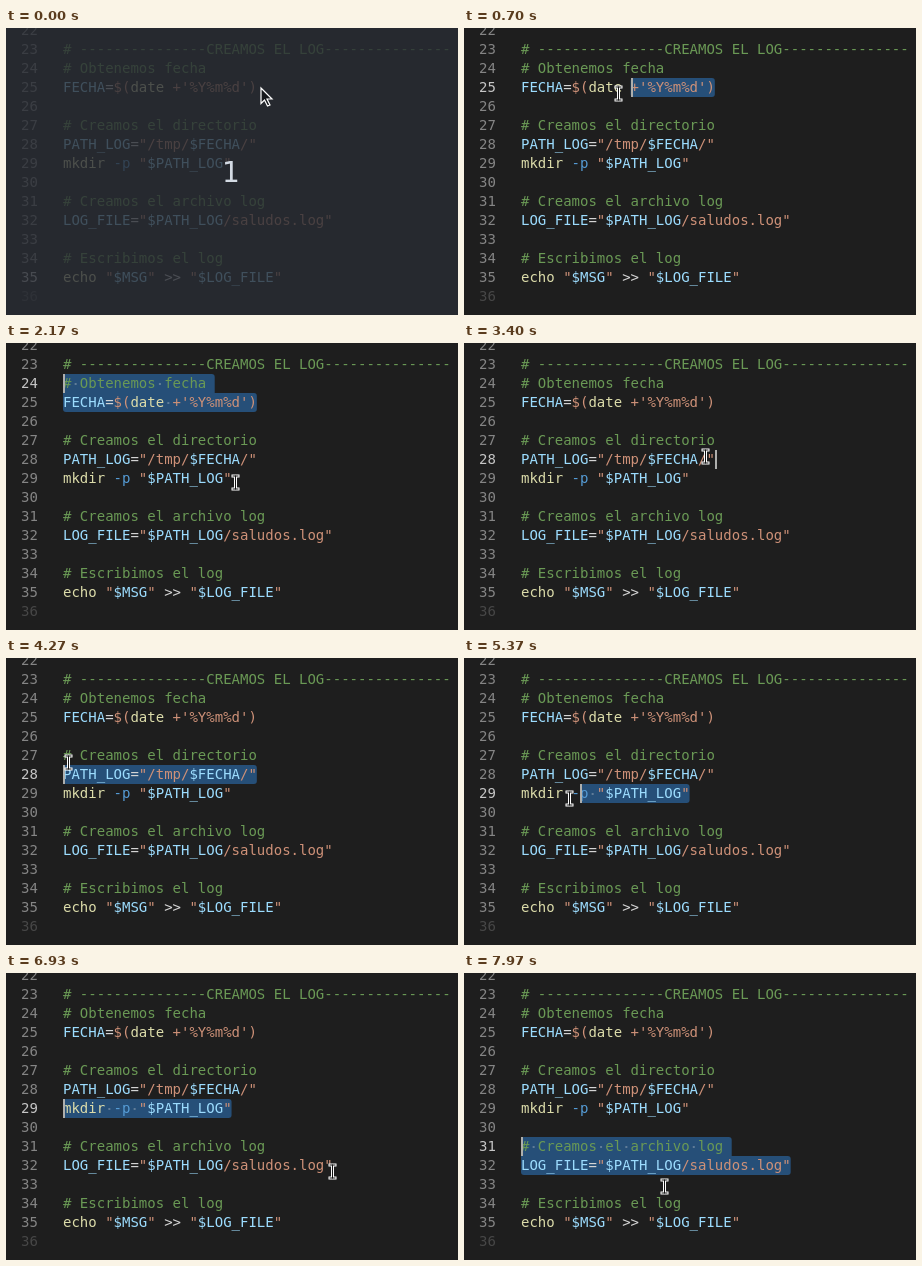
Recreate the animation shown at these times as an HTML page with a canvas. Size 452 by 287 pixels, loop 8 s.

```html
<!DOCTYPE html>
<html lang="es">
<meta charset="utf-8">
<style>
html, body { margin: 0; width: 100%; height: 100%; overflow: hidden; background: #1e1e1e; }
canvas { display: block; }
</style>
<canvas width="452" height="287"></canvas>
<script>
const ctx = document.querySelector('canvas').getContext('2d');
const LOOP = 8000, FIRST = 22, ROW = 19, LEFT = 57, CHAR = 14 * 0.602, LAG = 20;

const lines = [
  '',
  '# ---------------CREAMOS EL LOG---------------',
  '# Obtenemos fecha',
  "FECHA=$(date +'%Y%m%d')",
  '',
  '# Creamos el directorio',
  'PATH_LOG="/tmp/$FECHA/"',
  'mkdir -p "$PATH_LOG"',
  '',
  '# Creamos el archivo log',
  'LOG_FILE="$PATH_LOG/saludos.log"',
  '',
  '# Escribimos el log',
  'echo "$MSG" >> "$LOG_FILE"',
  ''
];

// One capture group per colour: comment, variable, string, option, command
const syntax = /(#.*)|(\$?[A-Z_]{2,})|(\+'.*'|\$\(|\)|"|\/[a-z.\/]*)|(-p)|(mkdir|date|echo)|./g;
const colors = ['#6a9955', '#9cdcfe', '#ce9178', '#569cd6', '#dcdcaa'];

// Mouse strokes: each eases from the previous end to x, y; bow bends it vertically
const strokes = [
  { from: 0, to: 1, x: 254, y: 59 },
  { from: 470, to: 950, x: 43, y: 39, bow: 15, drag: true },
  { from: 1300, to: 1970, x: 229, y: 139 },
  { from: 2250, to: 2270, x: 224, y: 137, drag: true },
  { from: 2770, to: 2970, x: 254, y: 113 },
  { from: 3330, to: 3800, x: 46, y: 109, drag: true },
  { from: 4130, to: 4930, x: 237, y: 136, bow: -14 },
  { from: 5000, to: 5580, x: 49, y: 127, bow: 11, drag: true },
  { from: 5870, to: 6170, x: 244, y: 176 },
  { from: 6400, to: 6730, x: 332, y: 205 },
  { from: 6870, to: 6930, x: 326, y: 198 },
  { from: 6960, to: 7500, x: 43, y: 181, drag: true },
  { from: 7800, to: 7970, x: 200, y: 213 }
];

const rowY = row => 12 + (row - 1) * ROW;
const colX = col => LEFT + col * CHAR;

function pointerAt(t) {
  const i = strokes.findLastIndex(s => s.from <= t);
  const { from, to, x, y, bow = 0 } = strokes[i];
  const start = strokes[Math.max(0, i - 1)];
  const k = Math.min(1, (t - from) / (to - from));
  const ease = k * k * (3 - 2 * k);
  return {
    x: start.x + (x - start.x) * ease,
    y: start.y + (y - start.y) * ease + bow * Math.sin(Math.PI * k)
  };
}

function caretAt(t) {
  const { x, y } = pointerAt(t);
  const row = Math.floor((y - 12) / ROW) + 1;
  const col = Math.round((x - LEFT) / CHAR);
  return { row, col: Math.max(0, Math.min(lines[row].length, col)) };
}

function drawSelection(start, end) {
  for (let row = start.row; row <= end.row; row++) {
    const isFirst = row === start.row, isLast = row === end.row;
    const from = isFirst ? start.col : 0;
    const to = isLast ? end.col : lines[row].length + 1;
    if (to <= from) continue;
    const bottom = isLast ? 3 : 0;
    ctx.fillStyle = '#264f78';
    ctx.beginPath();
    ctx.roundRect(colX(from), rowY(row), (to - from) * CHAR, ROW, [isFirst ? 3 : 0, 3, bottom, bottom]);
    ctx.fill();
    ctx.fillStyle = 'rgba(227,228,226,.3)';
    for (let col = from; col < to; col++)
      if (lines[row][col] === ' ') ctx.fillRect(colX(col + 0.5) - 1, rowY(row) + 9, 2, 2);
  }
}

function drawText(activeRow) {
  ctx.font = '14px "DejaVu Sans Mono", monospace';
  ctx.textAlign = 'left';
  lines.forEach((line, row) => {
    const y = rowY(row) + 14;
    ctx.fillStyle = row === activeRow ? '#c6c6c6' : row === lines.length - 1 ? '#474747' : '#858585';
    ctx.fillText(FIRST + row, 15, y);
    for (const m of line.matchAll(syntax)) {
      ctx.fillStyle = colors[m.slice(1).findIndex(Boolean)] || '#d4d4d4';
      ctx.fillText(m[0], colX(m.index), y);
    }
  });
}

function strokeShape(shape, color, width) {
  ctx.strokeStyle = color;
  ctx.lineWidth = width;
  ctx.stroke(shape);
}

const beam = new Path2D('M-2.5-6.5H2.5M0-6.5V6.5M-2.5 6.5H2.5');
const arrow = new Path2D('M.5.5V16L4 12.5 7 18.5 9.5 17.5 6.5 11.5H11.5Z');

function drawPointer(t, isArrow) {
  const { x, y } = pointerAt(t);
  ctx.save();
  ctx.translate(Math.round(x) + 0.5, Math.round(y) + 0.5);
  if (isArrow) {
    ctx.fillStyle = '#16181c';
    ctx.fill(arrow);
    strokeShape(arrow, '#fff', 1.2);
  } else {
    ctx.lineCap = 'square';
    strokeShape(beam, '#fff', 3);
    strokeShape(beam, '#111', 1);
  }
  ctx.restore();
}

function drawCountdown() {
  ctx.fillStyle = 'rgba(40,44,52,.8)';
  ctx.fillRect(0, 0, 452, 287);
  ctx.fillStyle = '#d3dae3';
  ctx.font = '28px "DejaVu Sans", sans-serif';
  ctx.textAlign = 'center';
  ctx.fillText('1', 225, 154);
}

function draw(t) {
  ctx.fillStyle = '#1e1e1e';
  ctx.fillRect(0, 0, 452, 287);
  const drag = strokes.findLast(s => s.drag && s.from <= t);
  if (drag) {
    const anchor = caretAt(drag.from);
    const caret = caretAt(Math.max(drag.from, Math.min(t - LAG, drag.to)));
    drawSelection(caret, anchor);
    drawText(caret.row);
    const idle = Math.max(0, t - drag.to);
    if (idle % 1000 < 500) {
      ctx.fillStyle = '#aeafad';
      ctx.fillRect(Math.round(colX(caret.col)), rowY(caret.row), 2, ROW);
    }
  } else {
    drawText(13);
  }
  const counting = t < 30;
  if (counting) drawCountdown();
  drawPointer(t, counting);
}

const begin = performance.now();
function tick() {
  draw((performance.now() - begin) % LOOP);
  requestAnimationFrame(tick);
}
tick();
</script>
</html>
```
